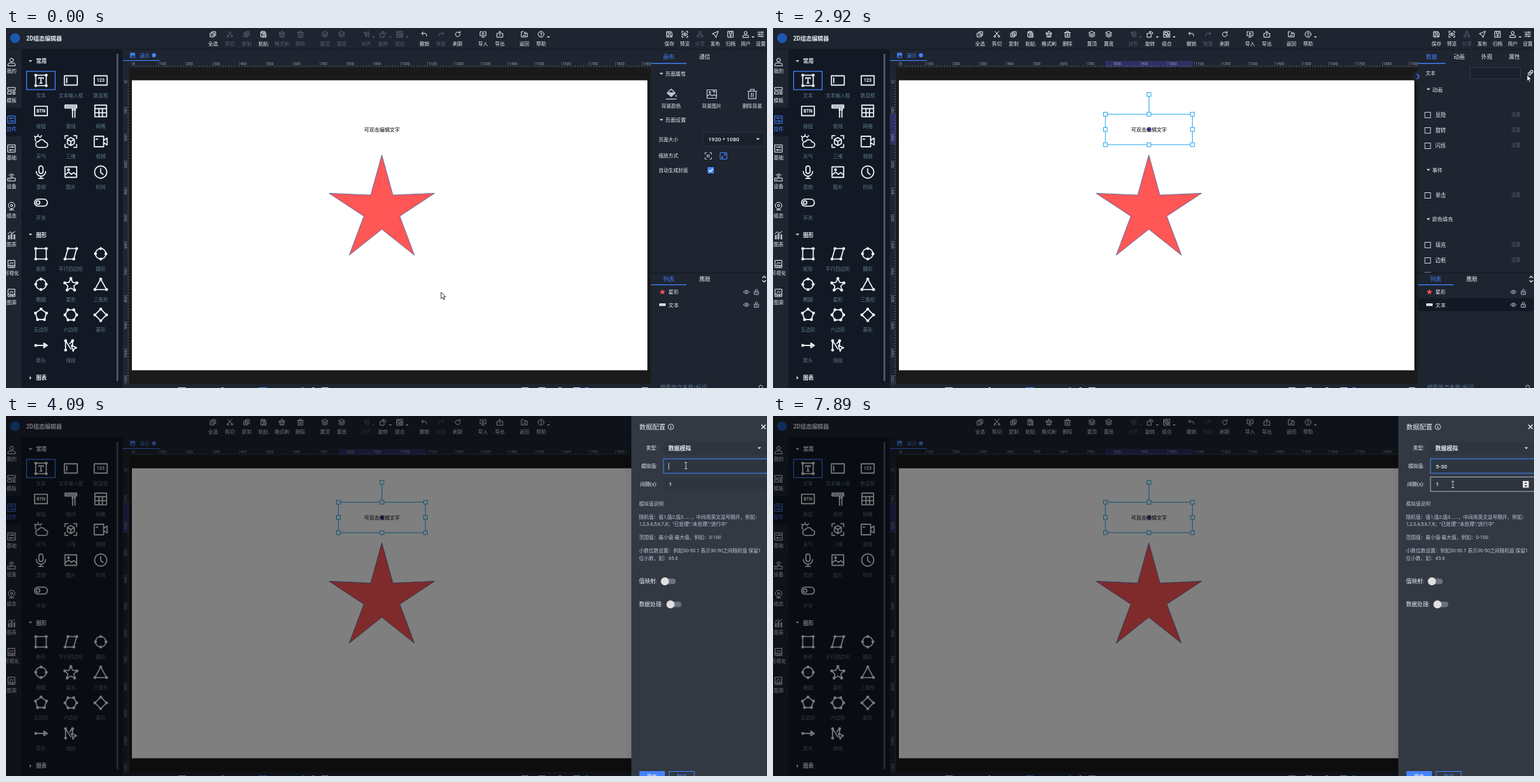
An HTML page with a canvas for the animation above (8000 ms loop, 1088x515 px).

```html
<!DOCTYPE html>
<html lang="zh">
<head>
<meta charset="utf-8">
<title>2D组态编辑器</title>
<style>
html, body { margin: 0; width: 100%; height: 100%; overflow: hidden; background: #1e2430 }
canvas { display: block }
</style>
</head>
<body>
<canvas id="stage" width="1088" height="515"></canvas>
<script>
const g = document.getElementById('stage').getContext('2d');
const BAR = '#1e2430', PANEL = '#121924', TEXT = '#bdc7db', BRIGHT = '#e9edf6',
  MUTED = '#617b91', OFF = '#59606c', BLUE = '#4583ff', PICK = '#2fabf0', LOOP = 8000;

// ---- drawing helpers
function text(s, x, y, size = 7, color = TEXT, align = 'left', weight = 400) {
  g.font = `${weight} ${size}px Roboto, "Noto Sans CJK SC", "Noto Sans CJK", sans-serif`;
  g.textAlign = align;
  g.fillStyle = color;
  g.fillText(s, x, y + size * 0.37);
}
const label = (s, x, y, color, size) => text(s, x, y, size, color, 'center');
function rect(x, y, w, h, fill, line, width = 1) {
  if (fill) { g.fillStyle = fill; g.fillRect(x, y, w, h); }
  if (line) { g.strokeStyle = line; g.lineWidth = width; g.strokeRect(x, y, w, h); }
}
function shape(d, fill, line, width = 1) {
  const p = new Path2D(d);
  if (fill) { g.fillStyle = fill; g.fill(p); }
  if (line) { g.strokeStyle = line; g.lineWidth = width; g.stroke(p); }
}
const ring = (x, y, r) => `M${x + r} ${y}a${r} ${r} 0 1 1 ${-2 * r} 0a${r} ${r} 0 1 1 ${2 * r} 0`;
const disc = (x, y, r, fill, line, width) => shape(ring(x, y, r), fill, line, width);
const spokes = (n, r, x = 12, y = 12, turn = 0) => Array.from({ length: n }, (_, i) => {
  const a = (i / n - 0.25 + turn) * 2 * Math.PI;
  return `${(x + r * Math.cos(a)).toFixed(2)} ${(y + r * Math.sin(a)).toFixed(2)}`;
});
const closed = pts => 'M' + pts.join('L') + 'Z';
const dots = pts => pts.map(p => `M${p}h.1`).join('');
const nodes = pts => [closed(pts), dots(pts)];
const star = (x, y, R, r) => {
  const inner = spokes(5, r, x, y, 0.1);
  return closed(spokes(5, R, x, y).flatMap((p, i) => [p, inner[i]]));
};
const down = (x, y, color = BRIGHT, s = 2.6) => shape(`M${x - s} ${y - s / 2}h${2 * s}l${-s} ${s}z`, color);
const right = (x, y) => shape(`M${x - 1.2} ${y - 2.6}v5.2l2.6-2.6z`, BRIGHT);

// ---- icons on a 24 unit grid: outline, or [outline, node dots]
const frame = 'M2 7V2h5M17 2h5v5M22 17v5h-5M7 22H2v-5', box = 'M1 4h22v16H1z', square = ['3 3', '21 3', '21 21', '3 21'];
const picture = 'M2 3h20v18H2zM2 17l6-5 5 4 4-3 5 4' + ring(8, 8, 1.5);
const user = ring(12, 7, 5) + 'M2 22v-3a5 5 0 0 1 5-4h10a5 5 0 0 1 5 4v3z';
const trash = 'M2 6h20M8 6V2h8v4M4 6v16h16V6M10 10v8M14 10v8';
const layers = 'M12 2l10 5-10 5L2 7zM2 12l10 5 10-5M2 17l10 5 10-5';
const gallery = 'M3 2h18v20H3zM3 16h18M7 19h2M12 19h5M7 12l4-5 3 4 3-2';
const circle = [ring(12, 12, 9), dots(spokes(4, 9))];

const tools = [
  ['全选', 296, 'M8 8V3h13v13h-5M3 8h13v13H3zM6 14l3 3 5-5'],
  ['剪切', 320, 'M5 2l13 14M19 2L6 16' + ring(5, 19, 3) + ring(19, 19, 3), 1],
  ['复制', 344, 'M8 8V3h13v13h-5M3 8h13v13H3zM9.5 11v7M6 14.5h7', 1],
  ['粘贴', 368, 'M7 4H3v17h8M7 2h8v5H7zM15 4h4v4M11 10h10v12H11zM14 14h4M14 18h4'],
  ['格式刷', 394.5, 'M3 11h18V7h-7V2h-4v5H3zM5 11v10h14V11M10 21v-5M14 21v-5', 1],
  ['删除', 421, trash, 1],
  ['置顶', 456, layers, 1],
  ['置底', 480, layers, 1],
  ['对齐', 515, 'M21 2v20M17 5H5v5h12M17 14H9v5h8', 2, 1],
  ['旋转', 539, 'M3 9h13v13H3zM10 4h8a3 3 0 0 1 3 3v4M13 1l-3 3 3 3', 1, 1],
  ['组合', 563, 'M2 2h20v20H2zM6 6h8v8H6zM10 14v4h8v-8h-4', 1, 1],
  ['撤销', 598, 'M8 4L3 9l5 5M3 9h11a6 6 0 0 1 6 6v3'],
  ['恢复', 622, 'M16 4l5 5-5 5M21 9H10a6 6 0 0 0-6 6v3', 2],
  ['刷新', 646, 'M20 12a8 8 0 1 1-3-6.2M20 2v5h-5'],
  ['导入', 682, 'M7 3H2v14h20V3h-5M12 2v10M8 9l4 4 4-4M8 22h8'],
  ['导出', 706, 'M7 9H2v13h20V9h-5M12 16V2M8 6l4-4 4 4'],
  ['返回', 741, 'M9 3H2v18h20V8h-9M16 4l-4 4 4 4M8 16h8'],
  ['帮助', 765, ring(12, 12, 10) + 'M9 9a3 3 0 1 1 3 4v2M12 17v1.5', 0, 1],
  ['保存', 948.5, 'M3 3h14l4 4v14H3zM7 3v6h9V3M7 21v-7h10v7'],
  ['预览', 970.5, frame + 'M3 12q9-10 18 0q-9 10-18 0' + ring(12, 12, 2)],
  ['分享', 992, ring(12, 6, 4) + ring(5, 18, 3.5) + ring(19, 18, 3.5) + 'M10 10l-3 5M14 10l3 5', 2],
  ['发布', 1014, 'M22 2L2 10l8 4 4 8z'],
  ['归档', 1036, 'M3 2h18v20H3zM8 2v8h8V2M12 13v6M9 16l3 3 3-3'],
  ['用户', 1057.5, user, 0, 1],
  ['设置', 1079, 'M2 5h20M2 12h20M2 19h20M16 3v4M8 10v4M15 17v4'],
];
const sections = [
  ['我的', user],
  ['模板', 'M2 3h20v7H2zM2 14h9v7H2zM15 14h7M15 17.5h7M15 21h7'],
  ['控件', 'M2 2h20v20H2zM5 8h14M5 16h14M10 6v4M14 14v4'],
  ['基础', 'M2 2h20v20H2zM5 8h14M5 16h14M14 6v4M9 14v4'],
  ['设备', 'M2 14h20v8H2zM6 18h2M12 14v-4M8 9a5 5 0 0 1 8 0M5 6a9 9 0 0 1 14 0'],
  ['组态', ring(12, 10, 9) + ring(12, 10, 3) + 'M12 19v3M6 22h12'],
  ['图表', 'M3 22V13h3v9zM10 22V9h3v13zM18 22V11h3v11zM2 8l7-5 5 4 7-5'],
  ['可视化', gallery],
  ['图源', gallery],
];
const common = [
  ['文本', [closed(square) + 'M8 9V7.5h8V9M12 7.5v9M10 16.5h4', dots(square)]],
  ['文本输入框', box + 'M5 8v8'], ['数显框', box, '123'],
  ['按钮', box, 'BTN'], ['管线', 'M2 2h20v5H2zM14 10h6M15 7v16M19 7v16M2 4.5h20'],
  ['网格', 'M2 2h20v20H2zM2 8h20M2 15h20M9 8v14M15 8v14'],
  ['天气', 'M8 22h11a4.5 4.5 0 0 0 0-9a6 6 0 0 0-11-1a5 5 0 0 0 0 10M3 11a5 5 0 0 1 8-6M7 0v1M1 3l1 1M13 2l-1 1'],
  ['三维', frame + 'M12 5l6 3.5v7L12 19l-6-3.5v-7zM6 8.5l6 3.5 6-3.5M12 12v7'],
  ['视频', 'M1 3h16v18H1zM17 10l6-4v12l-6-4M4 8h3'],
  ['音频', 'M8.5 5a3.5 3.5 0 0 1 7 0v6a3.5 3.5 0 0 1-7 0zM4 11a8 8 0 0 0 16 0M12 19v4M8 23h8'],
  ['图片', picture], ['时间', ring(12, 12, 10.5) + 'M12 6v7l4 3'],
  ['开关', 'M7 6h10a6 6 0 0 1 0 12H7a6 6 0 0 1 0-12z' + ring(7, 12, 3)],
];
const shapes = [
  ['矩形', nodes(square)], ['平行四边形', nodes(['7 3', '22 3', '17 21', '2 21'])], ['圆形', circle],
  ['椭圆', circle], ['星形', [star(12, 13, 11, 5.5), dots(spokes(5, 11, 12, 13))]],
  ['三角形', nodes(['12 3', '22 21', '2 21'])],
  ['五边形', nodes(spokes(5, 10))], ['六边形', nodes(spokes(6, 10, 12, 12, 1 / 12))], ['菱形', nodes(spokes(4, 10))],
  ['箭头', ['M2 12h18M17 8l6 4-6 4z', dots(['3 12'])]],
  ['线段', ['M3 20V4l9 14M10 9l5-5v9M13 12l9 4-4 1.5-2 4.5z', dots(['3 4', '3 20', '15 4'])]],
];

function icon(d, x, y, size, color, width = 1) {
  const [line, knots] = [].concat(d), k = size / 24;
  g.save();
  g.translate(x - size / 2, y - size / 2);
  g.scale(k, k);
  g.lineCap = g.lineJoin = 'round';
  shape(line, null, color, width / k);
  if (knots) shape(knots, null, color, 5);
  g.restore();
}

// ---- fixed parts
function topBar(selected) {
  rect(0, 0, 1088, 30, BAR);
  disc(13, 14.5, 7, '#1d58b0');
  text('2D组态编辑器', 29, 15, 8.2, BRIGHT, 'left', 700);
  for (const [name, x, d, off, menu] of tools) {
    const color = off === 2 || (off && !selected) ? OFF : BRIGHT;
    icon(d, x, 9, 10, color);
    label(name, x, 22.7, color);
    if (menu) down(x + 10.5, 13, color, 2.2);
  }
}
function palette() {
  rect(0, 31, 22, 484, BAR);
  rect(22, 31, 145, 484, PANEL);
  rect(0, 114, 22, 41, PANEL);
  sections.forEach(([name, d], i) => {
    const color = i === 2 ? BLUE : BRIGHT, y = 48.5 + 41.3 * i;
    icon(d, 8, y, 12.5, color);
    label(name, 8, y + 13.2, color);
  });
  rect(158, 37, 2.5, 468, '#535a68');
  const grid = (items, top) => items.forEach(([name, d, word], i) => {
    const x = 50 + 42.7 * (i % 3), y = top + 43.7 * (i / 3 | 0);
    icon(d, x, y, 20, '#f4f6fb', 1.6);
    if (word) text(word, x, y, 6.5, '#f4f6fb', 'center', 700);
    label(name, x, y + 21.4, MUTED);
  });
  const head = (name, y) => text(name, 43, y, 7.6, BRIGHT, 'left', 700);
  rect(29.5, 62, 40.8, 26.2, null, BLUE, 1.2);
  down(35, 47.5); head('常用', 47.5); grid(common, 75);
  down(35, 295.5); head('图形', 296); grid(shapes, 323);
  right(35, 500.5); head('图表', 500.5);
}

const UNIT = 3.839, LEFT = 180, TOP = 74.8;
function rulers(selected) {
  rect(167, 47, 755, 9, BAR);
  rect(167, 47, 9, 463, BAR);
  if (selected) {
    rect(475, 47, 125, 9, '#302f63');
    rect(167, 123, 9, 44, '#302f63');
  }
  for (let i = 0; i < 194; i++) {
    const x = LEFT + i * UNIT, y = TOP + i * UNIT, long = i % 10 ? 2.5 : 8;
    rect(x, 56 - long, 0.6, long, '#6b717d');
    if (y < 509) rect(176 - long, y, long, 0.6, '#6b717d');
    if (i % 10) continue;
    text(i * 10, x + 1.5, 51, 5.4, '#a0a6b0');
    if (y > 509) continue;
    g.save();
    g.translate(171, y + 1.5);
    g.rotate(-Math.PI / 2);
    text(i * 10, 0, 0, 5.4, '#a0a6b0', 'right');
    g.restore();
  }
}
function footer() {
  rect(167, 509.5, 755, 6, BAR);
  for (const [x, w, blue] of [[246, 11], [308, 3], [361, 12, 1], [423, 3, 1], [438, 3], [451, 10], [737, 10], [761, 10], [790, 4], [811, 10], [828, 5, 1], [909, 9]])
    rect(x, 514, w, 1, blue ? BLUE : TEXT);
}
function workspace(t) {
  const selected = t >= 1730, starHover = t >= 1090 && t < 1360, textHover = t >= 1480 && !selected;
  rect(167, 31, 755, 484, '#1a1a1a');
  rect(167, 31, 755, 16, BAR);
  rect(167, 46, 53, 1.3, BLUE);
  rect(177.5, 35.5, 7, 7, BLUE);
  shape('M178.5 41.5l2-3 1.5 1.5 1-1 1 2.5z', BAR);
  text('演示', 191, 39.3, 7.3, BLUE);
  disc(211.5, 39, 3, BLUE);
  rulers(selected);
  footer();
  rect(LEFT, TOP, 737, 414.8, '#fff');
  label('可双击编辑文字', 537.5, 145.5, '#000', 7.3);
  shape(star(537.3, 260.9, 79.3, 27), '#ff5656', starHover ? '#1890ff' : '#4a6aa5', starHover ? 1 : 0.8);
  const anchors = (cx, cy, w, h) => [[0, -h], [w, 0], [0, h], [-w, 0]].forEach(([x, y]) => disc(cx + x, cy + y, 2, '#fff', PICK, 0.8));
  if (starHover) anchors(537.3, 260.9, 79, 79);
  if (textHover) anchors(537.5, 145, 62.5, 22);
  if (!selected) return;
  rect(475.2, 123.3, 124.4, 43.6, null, PICK);
  rect(537, 97, 1, 26, PICK);
  shape('M537.5 141.5l3.5 3.5-3.5 3.5-3.5-3.5z', '#2a2a86');
  const knob = (x, y) => rect(x - 2.7, y - 2.7, 5.5, 5.5, '#fff', PICK);
  for (const x of [475.2, 537.4, 599.6])
    for (const y of [123.3, 145, 166.9]) if (x !== 537.4 || y !== 145) knob(x, y);
  knob(537.4, 95);
}

// ---- right side
const tab = (name, x, y, on) => label(name, x, y, on ? BLUE : BRIGHT, 8);
function heading(name, y) {
  down(937, y);
  text(name, 942.5, y, 7.4, BRIGHT, 'left', 500);
}
function pagePanel() {
  tab('画布', 947.5, 41, true);
  tab('通信', 999, 41);
  rect(922, 50, 51, 1.3, BLUE);
  heading('页面属性', 65.5);
  icon(['M4 10l8-8 8 8-8 7zM4 10h16M22 14v3M2 22h20', dots(['9 11', '12 11', '15 11', '12 13'])], 951, 94.5, 17, TEXT, 1.4);
  icon(picture + 'M17 3V9M14 6h6', 1009, 94.5, 16, TEXT, 1.2);
  icon(trash, 1067, 94.5, 16, TEXT, 1.2);
  ['背景颜色', '背景图片', '删除背景'].forEach((s, i) => label(s, 951 + 58 * i, 111.5, BRIGHT));
  heading('页面设置', 131.5);
  text('页面大小', 933, 159.3, 7, BRIGHT);
  rect(996.5, 149.5, 88, 20, '#1b212c', '#293140');
  text('1920 * 1080', 1004, 159.5, 8.1, BRIGHT, 'left', 500);
  down(1075, 159);
  text('缩放方式', 933, 182.5, 7, BRIGHT);
  icon(frame + 'M9 9h6v6H9z', 1004, 183, 11, TEXT);
  icon('M2 2h20v20H2zM13 11l5-5M14 6h4v4M11 13l-5 5M6 14v4h4', 1026, 183, 11, BLUE);
  text('自动生成封面', 933, 203.5, 7, BRIGHT);
  rect(1003, 199, 9, 9, BLUE);
  shape('M1005 203.5l2 2 3.5-4', null, '#fff', 1.2);
}
function nodePanel(t) {
  ['数据', '动画', '外观', '属性'].forEach((s, i) => tab(s, 941.5 + 39.5 * i, 41, !i));
  rect(t < 1850 ? 1040 : 922, 50, 39.5, 1.3, BLUE);
  text('文本', 933, 64.3, 7, BRIGHT);
  rect(996.5, 56.5, 72, 16, '#1b212c', t >= 2380 && t < 2500 ? TEXT : '#303846');
  icon('M10 14a5 5 0 0 1 0-7l3-3a5 5 0 0 1 7 7l-2 2M14 10a5 5 0 0 1 0 7l-3 3a5 5 0 0 1-7-7l2-2', 1083, 64, 9, BRIGHT, 1.2);
  for (const y of [101.5, 181.5, 216.5, 252.5, 288.5]) rect(922, y, 166, 0.7, '#262d3a');
  heading('动画', 87.8);
  heading('事件', 203);
  heading('颜色填充', 273.5);
  const rows = { 显隐: 124.5, 旋转: 146.5, 闪烁: 168.5, 单击: 239.5, 填充: 310.5, 边框: 332.5, '': 354 };
  for (const [name, y] of Object.entries(rows)) {
    rect(932, y - 4, 8, 8, null, TEXT);
    text(name, 947, y, 7.6, BRIGHT);
    if (name) label('设置', 1062, y - 0.5, OFF, 6.6);
  }
}
function sidePanel(t) {
  const selected = t >= 1730;
  rect(922, 31, 166, 484, BAR);
  selected ? nodePanel(t) : pagePanel();
  rect(922, 350, 166, 165, BAR);
  rect(922, 350, 166, 0.8, '#11161f');
  tab('列表', 947.5, 359.3, true);
  tab('鹰眼', 999, 359.3);
  rect(922, 366.8, 51, 1.2, BLUE);
  shape('M1081.5 357.5l2.5-2.5 2.5 2.5M1081.5 361l2.5 2.5 2.5-2.5', null, BRIGHT, 1.2);
  if (selected) rect(922, 386.5, 166, 18.5, PANEL);
  shape(star(938.5, 377.8, 4.6, 1.8), '#ff5656');
  rect(934, 394, 9, 3.6, '#fff');
  rect(937, 395.6, 3, 0.6, '#555');
  ['星形', '文本'].forEach((s, i) => {
    const y = 377.6 + 18.3 * i;
    text(s, 947, y, 7.4, BRIGHT);
    icon('M1 12q11-13 22 0q-11 13-22 0' + ring(12, 12, 3), 1058.5, y, 9, TEXT, 0.9);
    icon('M4 10h16v12H4zM8 10V6a4 4 0 0 1 8-1M12 14v4', 1073, y, 8.5, TEXT, 0.9);
  });
  text('搜索节点名称/标识', 935, 513.8, 8, MUTED);
  disc(1079, 513.5, 2.5, null, TEXT);
  if (t >= 2090 && t < 3050) {
    disc(922, 69.3, 8, BAR);
    shape('M920.5 65.5l3.5 3.8-3.5 3.8', null, BLUE, 1.3);
  }
}

// ---- drawer, in coordinates of its left edge
const edits = [[4090, ''], [5190, '5'], [6010, '5-'], [6940, '5-3'], [7090, '5-30']];
const latest = (rows, t) => rows.filter(r => r[0] <= t).pop();

function drawer(t) {
  const x = t < 3170 ? 923 : 894, HOVER = '#a9b0bb', FIELD = '#2e353f';
  rect(0, 0, 1088, 515, `rgba(0,0,0,${t < 3170 ? 0.4 : 0.5})`);
  g.save();
  g.translate(x, 0);
  rect(-7, 0, 7, 515, 'rgba(0,0,0,.04)');
  rect(0, 0, 194, 515, '#323943');
  text('数据配置', 11.5, 15.7, 9.3, BRIGHT, 'left', 500);
  disc(56.5, 15.5, 3.9, null, BRIGHT, 0.9);
  rect(56, 13.3, 1, 1, BRIGHT);
  rect(56, 15, 1, 2.8, BRIGHT);
  shape('M186 12.5l6 6M192 12.5l-6 6', null, BRIGHT, 1.3);

  const field = (name, y, border) => {
    text(name, 37, y - 0.5, 7, BRIGHT, 'right');
    rect(46, y - 10.2, 150, 20.6, FIELD, border || '#343b45');
  };
  const inputHover = (t < 3290) || (t >= 3430 && t < 3570) || t >= 3970;
  const stepHover = t >= 7770;
  field('类型:', 46.3, t >= 3570 && t < 3970 && HOVER);
  text('数据模拟', 53, 46.5, 8.1, BRIGHT, 'left', 700);
  down(183, 46);
  field('模拟值:', 71.5, t >= 4090 ? BLUE : inputHover && HOVER);
  field('间隔(s):', 97.5, stepHover && HOVER);
  text('1', 53.5, 97.5, 8.1, BRIGHT, 'left', 500);
  if (stepHover) {
    rect(178, 93, 8.5, 9.5, '#efefef');
    shape('M180 97l2.2-2.6 2.2 2.6zM180 99l2.2 2.6 2.2-2.6z', '#444');
  }
  const edit = latest(edits, t);
  if (edit) {
    text(edit[1], 53.5, 71.7, 8.1, BRIGHT, 'left', 500);
    if (Math.floor((t - edit[0]) / 535) % 2 === 0)
      rect(53.3 + g.measureText(edit[1]).width, 67, 0.8, 9.5, BRIGHT);
  }

  const help = ['模拟值说明', '随机值：值1,值2,值3......，中间用英文逗号隔开，例如：', '1,2,3,4,5,6,7,8；"已处理","未处理","进行中"',
    '范围值：最小值-最大值，例如：0-100', '小数位数设置：例如30-50.1 表示30-50之间随机值 保留1', '位小数，如：45.6'];
  [125.5, 144.3, 154.7, 173.5, 192.5, 203].forEach((y, i) => text(help[i], 11, y));
  [['值映射:', 236.5, 48], ['数据处理:', 269.5, 56]].forEach(([name, y, kx]) => {
    text(name, 11, y, 8, BRIGHT);
    g.beginPath();
    g.roundRect(kx - 3, y - 4, 18.5, 8, 4);
    g.fillStyle = '#6d717a';
    g.fill();
    disc(kx, y, 5.8, '#e0e0e0');
  });
  rect(11.5, 508, 36.5, 12, BLUE);
  label('确定', 29.5, 515, '#fff');
  rect(54, 508.5, 36, 12, null, BLUE);
  label('取消', 72, 515, BLUE);
  g.restore();
}

// time, x, y, and 1 for a text beam
const pointer = [
  [0, 622, 378], [970, 598, 336], [1090, 562, 284], [1240, 545, 232], [1360, 539, 178], [1480, 537, 150],
  [1850, 640, 146], [1970, 872, 132], [2090, 1045, 118], [2240, 1062, 87], [2380, 1064, 69, 1], [2500, 1071, 69],
  [2620, 1075, 68], [2770, 1078, 67], [3050, 1076, 67, 1], [3170, 984, 84], [3430, 974, 73, 1], [3570, 968, 48],
  [3970, 971, 68, 1], [4090, 972, 71, 1], [7650, 972, 76, 1], [7770, 972, 88, 1], [7890, 972, 98, 1],
];
function cursor(t) {
  const [, x, y, beam] = latest(pointer, t);
  g.save();
  g.translate(x, y);
  if (beam) shape('M-2-4.5h4M0-4.5v9M-2 4.5h4', null, '#c9cdd4', 0.9);
  else shape('M0 0v9.2l2.1-2 1.6 3.5 1.5-.7-1.6-3.4h2.9z', '#fff', '#111', 0.8);
  g.restore();
}

function draw(now) {
  const t = now % LOOP;
  rect(0, 0, 1088, 515, '#141a24');
  workspace(t);
  palette();
  sidePanel(t);
  topBar(t >= 1730);
  if (t >= 3050) drawer(t);
  cursor(t);
  requestAnimationFrame(draw);
}
requestAnimationFrame(draw);
</script>
</body>
</html>
```
